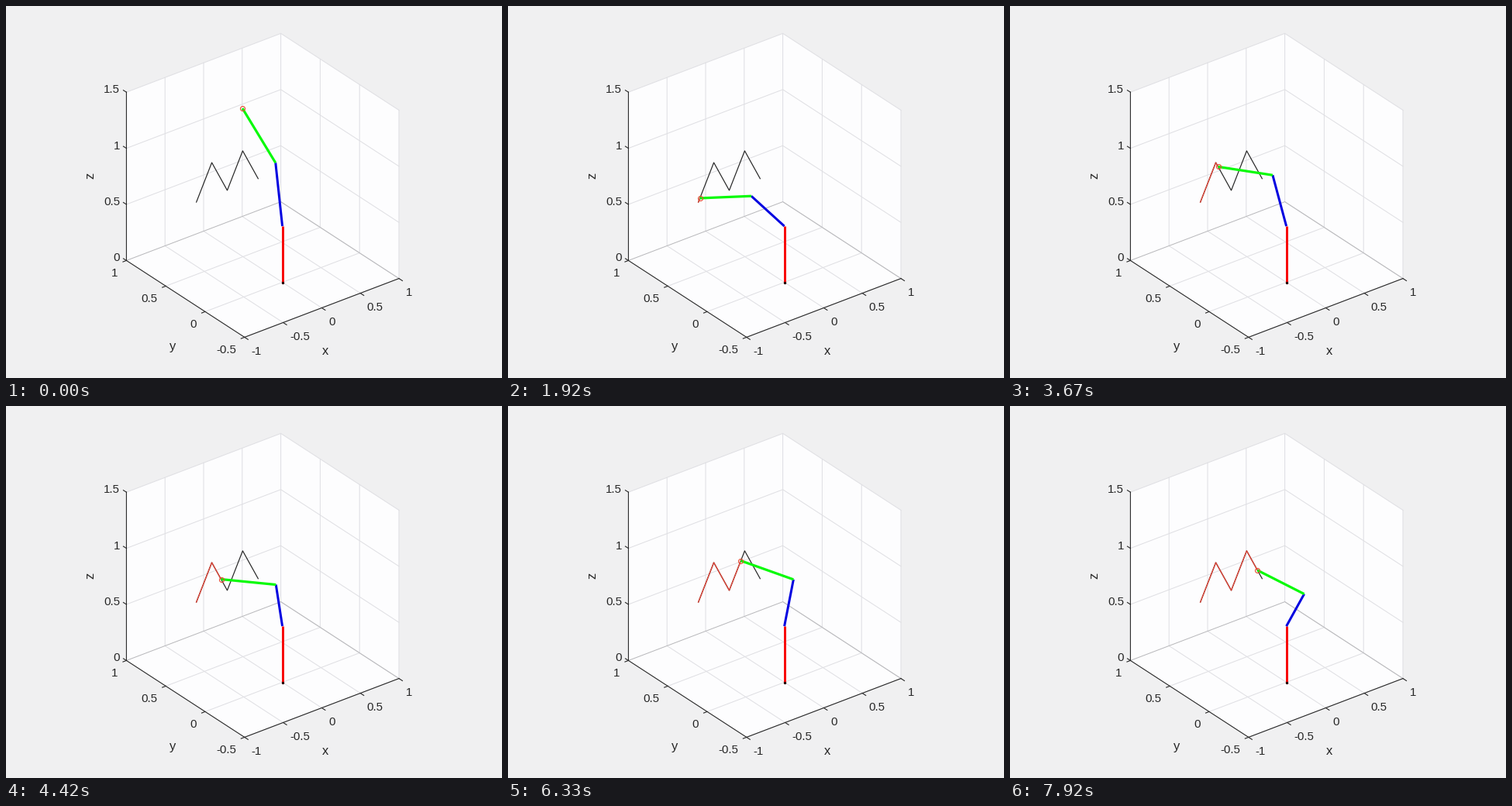
Write a matplotlib script that moves like this. It is 640 px wide and 480 px high and loops after 8000 ms.

```python
import numpy as np
import matplotlib.pyplot as plt
from matplotlib.animation import FuncAnimation

W, H, DPI = 640, 480, 100
PX = 72 / DPI  # points per pixel
LOOP_MS, TICK_MS = 8000, 40
STEP_MS = LOOP_MS / 96  # time between two poses

BACK, WALL, GRID, EDGE = "#f0f0f1", "#fdfdfe", "#dfdfe3", "#b9b9bc"
INK = "#262626"

LINK = 0.5
HOME = np.array([-0.01, 0.497, 1.326])
APPROACH = 21  # poses until the tip reaches the path

plt.rcParams["font.family"] = "Liberation Sans"


def project(p):
    """Orthographic view of x, y, z in stage pixels."""
    x, y, z = np.asarray(p, float).T
    return (356.6 + 99.6 * x - 101.6 * y,
            356.5 - 37.9 * x - 66.0 * y - 144.8 * z)


def path_point(k):
    """Point of the zigzag after k steps of 0.01 in x."""
    rise = 1 - abs(k % 40 - 20) / 20
    return np.array([-0.4 + 0.01 * k, 0.7, 0.5 + 0.3 * rise])


def tip_at(n):
    if n >= APPROACH:
        return path_point(n - APPROACH)
    s = 0.0407 * n + 0.000329 * n * n
    return HOME + s * (path_point(0) - HOME)


def elbow_for(tip):
    """Both outer links are equally long; the elbow bends to the right."""
    t = tip - [0, 0, LINK]
    sq = t @ t
    z = LINK * t[2] / sq
    r = np.hypot(t[0], t[1])
    u = t[:2] / r
    along = (sq / 2 - z * t[2]) / r
    side = np.sqrt(max(LINK**2 - z * z - along**2, 0))
    xy = along * u + side * np.array([u[1], -u[0]])
    return np.array([xy[0], xy[1], LINK + z])


fig = plt.figure(figsize=(W / DPI, H / DPI), dpi=DPI, facecolor=BACK)
ax = fig.add_axes([0, 0, 1, 1])
ax.set_xlim(0, W)
ax.set_ylim(H, 0)
ax.axis("off")


def line(pts, color, width, **kw):
    return ax.plot(*project(pts), color=color, lw=width * PX, **kw)[0]


def label(x, y, s, ha, size=15, **kw):
    ax.text(x, y, s, ha=ha, color=INK, size=size * PX,
            **{"va": "baseline", **kw})


def draw_box():
    walls = [
        [(-1, -.5, 0), (1, -.5, 0), (1, 1, 0), (-1, 1, 0)],
        [(-1, 1, 0), (1, 1, 0), (1, 1, 1.5), (-1, 1, 1.5)],
        [(1, -.5, 0), (1, 1, 0), (1, 1, 1.5), (1, -.5, 1.5)],
    ]
    for w in walls:
        ax.fill(*project(w), color=WALL, lw=0)
    for x in (-.5, 0, .5, 1):
        line([(x, -.5, 0), (x, 1, 0), (x, 1, 1.5)], GRID, 1)
    for y in (-.5, 0, .5):
        line([(-1, y, 0), (1, y, 0), (1, y, 1.5)], GRID, 1)
    for z in (.5, 1, 1.5):
        line([(-1, 1, z), (1, 1, z), (1, -.5, z)], GRID, 1)
    line([(-1, 1, 0), (1, 1, 0), (1, -.5, 0)], EDGE, 1)
    line([(-1, 1, 1.5), (-1, 1, 0), (-1, -.5, 0), (1, -.5, 0)], INK, 1.1)


def ticks(points, labels, step, offset, ha):
    for p, s in zip(points, labels):
        x, y = (v[0] for v in project([p]))
        ax.plot([x, x + step[0]], [y, y + step[1]], color=INK, lw=1.1 * PX)
        label(x + offset[0], y + offset[1], s, ha)


def draw_labels():
    ticks([(-1, 1, z) for z in (0, .5, 1, 1.5)], ["0", "0.5", "1", "1.5"],
          (-4, -2.5), (-8.5, 1), "right")
    ticks([(-1, y, 0) for y in (-.5, 0, .5, 1)], ["-0.5", "0", "0.5", "1"],
          (-4.5, 1.7), (-11, 21), "right")
    ticks([(x, -.5, 0) for x in (-1, -.5, 0, .5, 1)],
          ["-1", "-0.5", "0", "0.5", "1"], (4.5, 2.9), (8.5, 22.5), "left")
    label(411.7, 450.5, "x", "center", 16.5)
    label(215.5, 444, "y", "center", 16.5)
    label(116, 219, "z", "right", 16.5, va="center", rotation=90)


draw_box()
draw_labels()
line([path_point(k) for k in range(0, 81, 20)], INK, 1.2)

base, shoulder = np.array([0, 0, 0]), np.array([0, 0, LINK])
trail = line([path_point(0)], "#e0473a", 1.4)
line([base, shoulder], "#f80808", 3, solid_capstyle="butt")
upper = line([shoulder, shoulder], "#0000e0", 3, solid_capstyle="butt")
fore = line([shoulder, shoulder], "#08fa08", 3.2, solid_capstyle="butt")
line([base], "#200000", 1, marker="o", ms=3.4 * PX, mew=0)
tip_mark = line([shoulder], "none", 1, marker="o", ms=6 * PX,
                mfc="none", mec="#e84a30", mew=1.1 * PX)


def update(frame):
    # a pose is shown from the tick in which it falls due
    n = int(((frame + 1) * TICK_MS - 1) / STEP_MS)
    tip = tip_at(n)
    elbow = elbow_for(tip)
    upper.set_data(*project([shoulder, elbow]))
    fore.set_data(*project([elbow, tip]))
    tip_mark.set_data(*project([tip]))
    done = max(n - APPROACH, 0)
    trail.set_data(*project([path_point(k) for k in range(done + 1)]))
    return trail, upper, fore, tip_mark


anim = FuncAnimation(fig, update, frames=LOOP_MS // TICK_MS, interval=TICK_MS,
                     repeat=True, repeat_delay=0, blit=False)
plt.show()
```
